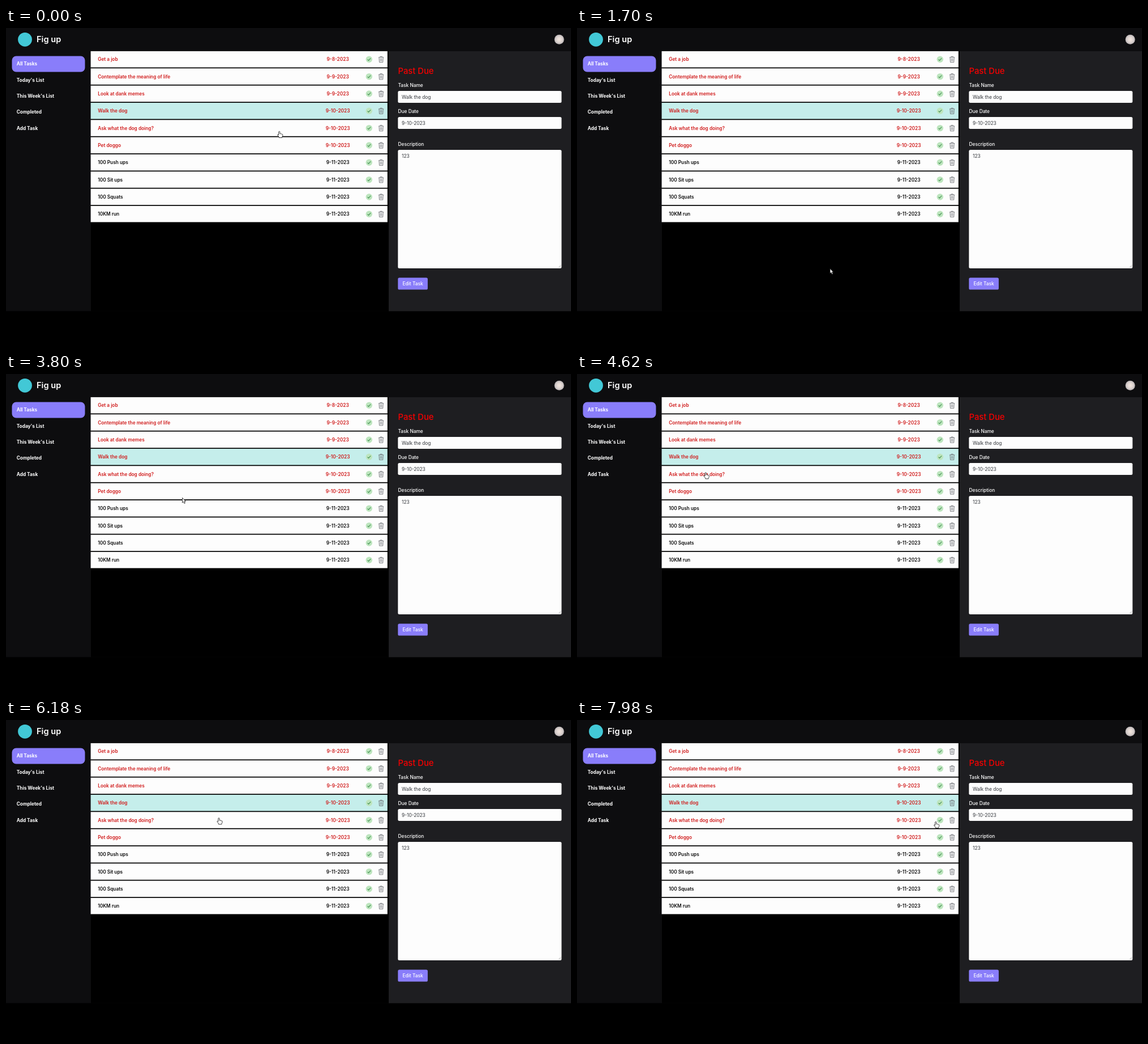
Animation of 998x561 px, one loop 8000 ms. Source, as an HTML page:

```html
<!DOCTYPE html>
<html lang="en">
<head>
<meta charset="utf-8">
<title>Task list</title>
<style>
  html, body { margin: 0; width: 100%; height: 100%; overflow: hidden; background: #000; }
  svg { display: block; width: 100%; height: 100%; }
  text { font: 500 8.34px Inter, sans-serif; fill: #fff; }
  .title { font-size: 14.6px; font-weight: 600; }
  .alert { font-size: 14.8px; fill: #f40000; }
  .nav { font-size: 8.3px; font-weight: 700; }
  .value { font-weight: 400; fill: #33363b; }
  .task { font-size: 8.3px; font-weight: 600; fill: #0c0c0c; }
  .late { fill: #d01c1c; }
  .mid { text-anchor: middle; }
  .accent { fill: #897dfa; }
  .field { fill: #fdfdfd; }
  .row { fill: #fdfdfd; }
  .selected .row { fill: #c5eeeb; }
</style>
</head>
<body>
<svg viewBox="0 0 998 561">
  <defs>
    <radialGradient id="portrait">
      <stop offset="0" stop-color="#f3e6de"/>
      <stop offset=".6" stop-color="#dcd3d0"/>
      <stop offset="1" stop-color="#b9b3b5"/>
    </radialGradient>
    <g id="done">
      <circle r="5.7" fill="#bde5be"/>
      <path d="M-2.7 .2 L-.8 2.1 L2.8 -2" fill="none" stroke="#4a9557" stroke-width="1.2"/>
    </g>
    <g id="trash" fill="none" stroke="#62656a" stroke-width=".8">
      <path d="M-4.6 -3.5 H4.6 M-1.7 -3.6 V-5 H1.7 V-3.6 M-3.7 -3.4 L-3.1 5.2 H3.1 L3.7 -3.4"/>
      <path d="M-1.5 -1.8 V3.6 M0 -1.8 V3.6 M1.5 -1.8 V3.6" stroke-width=".6"/>
    </g>
  </defs>

  <rect width="998" height="499.5" fill="#0d0d0f"/>
  <rect x="150" y="41" width="526" height="458.5"/>
  <rect x="676" y="41" width="322" height="458.5" fill="#1e1e21"/>

  <circle cx="33.5" cy="20.3" r="12.4" fill="#42c8d6"/>
  <text class="title" x="54" y="25">Fig up</text>
  <circle cx="977.2" cy="20.2" r="8.5" fill="url(#portrait)"/>

  <rect class="accent" x="10.5" y="49.5" width="129" height="28" rx="7.5"/>
  <g id="nav"></g>
  <g id="list"></g>

  <text class="alert" x="692.5" y="81">Past Due</text>
  <text x="692.5" y="104">Task Name</text>
  <rect class="field" x="692.3" y="111.1" width="289" height="21" rx="2.5"/>
  <text class="value" x="699" y="124.9">Walk the dog</text>
  <text x="692.5" y="149.8">Due Date</text>
  <rect class="field" x="692.3" y="156.9" width="289" height="21" rx="2.5"/>
  <text class="value" x="699" y="170.6">9-10-2023</text>
  <text x="692.5" y="208">Description</text>
  <rect class="field" x="692.3" y="215" width="289" height="209" rx="2.5"/>
  <text class="value" x="699" y="229">123</text>
  <path d="M975.8 422.8 L980.3 418.3 M978.3 422.8 L980.3 420.8" stroke="#777" stroke-width=".6"/>
  <rect class="accent" x="692.3" y="440.5" width="52.6" height="21" rx="2.6"/>
  <text class="mid" x="718.6" y="454">Edit Task</text>

  <g id="cursor" fill="#fff" stroke="#111" stroke-width=".8" stroke-linejoin="round">
    <path id="arrow" d="M0 0 V8.6 L2 6.8 L3.4 10 L5 9.3 L3.6 6.2 H6 Z"/>
    <path id="hand" d="M-1.1 1 Q0 -.6 1.1 1 V4.6 Q2.3 4 3 4.9 Q4.2 4.4 4.6 5.3 Q5.9 5 6 6.4 V8.4 L4.9 10.2 V11.5 H-.4 V10.4 L-3 6.9 Q-3.2 5.6 -1.9 5.9 L-1.1 6.7 Z"/>
  </g>
</svg>
<script>
  const LOOP = 8000, TOP = 40.9, PITCH = 30.33, ROW = 28.6;
  const byId = id => document.getElementById(id);

  const tasksByDay = {
    8: ['Get a job'],
    9: ['Contemplate the meaning of life', 'Look at dank memes'],
    10: ['Walk the dog', 'Ask what the dog doing?', 'Pet doggo'],
    11: ['100 Push ups', '100 Sit ups', '100 Squats', '10KM run']
  };
  const today = 11, selected = 'Walk the dog';
  const tasks = Object.entries(tasksByDay)
    .flatMap(([day, names]) => names.map(name => ({ name, day })));

  byId('nav').innerHTML = ['All Tasks', "Today's List", "This Week's List", 'Completed', 'Add Task']
    .map((label, i) => `<text class="nav" x="18.7" y="${66.3 + 28.36 * i}">${label}</text>`).join('');

  byId('list').innerHTML = tasks.map(({ name, day }, i) => {
    const kind = day < today ? 'task late' : 'task';
    return `<g class="${name === selected ? 'selected' : ''}" transform="translate(0 ${TOP + PITCH * i})">
      <rect class="row" x="149.6" width="524.2" height="${ROW}"/>
      <text class="${kind}" x="162.2" y="17.4">${name}</text>
      <text class="${kind} mid" x="586.1" y="17.4">9-${day}-2023</text>
      <use href="#done" x="641.3" y="14.4"/>
      <use href="#trash" x="662.6" y="14.4"/>
    </g>`;
  }).join('');

  // Each move is a curve from the last resting point, pulled towards a bend.
  const home = [482.7, 182];
  const moves = [
    { start: 860, end: 1700, bend: [425, 290], to: [447, 424.5] },
    { start: 1800, end: 2240, bend: [447, 441], to: [446, 457] },
    { start: 2780, end: 4360, bend: [359, 193.6], to: [219, 174] },
    { start: 4460, end: 4640, bend: [195, 158], to: [235, 177] },
    { start: 5340, end: 6140, bend: [272, 172], to: [369, 172.5] },
    { start: 6140, end: 7720, bend: [503.5, 173], to: [626, 175] },
    { start: 7820, end: 7980, bend: [642, 174], to: [633.7, 179] }
  ];

  const curve = (a, b, c, k) => (1 - k) ** 2 * a + 2 * k * (1 - k) * b + k * k * c;

  function pointerAt(time) {
    let point = home;
    for (const { start, end, bend, to } of moves) {
      if (time < start) break;
      const k = Math.min(1, (time - start) / (end - start));
      point = point.map((from, axis) => curve(from, bend[axis], to[axis], k));
    }
    return point;
  }

  function overRow(y) {
    const offset = y + 3 - TOP;
    return offset < PITCH * tasks.length && offset % PITCH < ROW;
  }

  function draw(time) {
    const [x, y] = pointerAt(time);
    const onRow = overRow(y);
    byId('cursor').setAttribute('transform', `translate(${x} ${y})`);
    byId('hand').style.display = onRow ? '' : 'none';
    byId('arrow').style.display = onRow ? 'none' : '';
  }

  const start = performance.now();
  function tick() {
    draw((performance.now() - start) % LOOP);
    requestAnimationFrame(tick);
  }
  tick();
</script>
</body>
</html>
```
